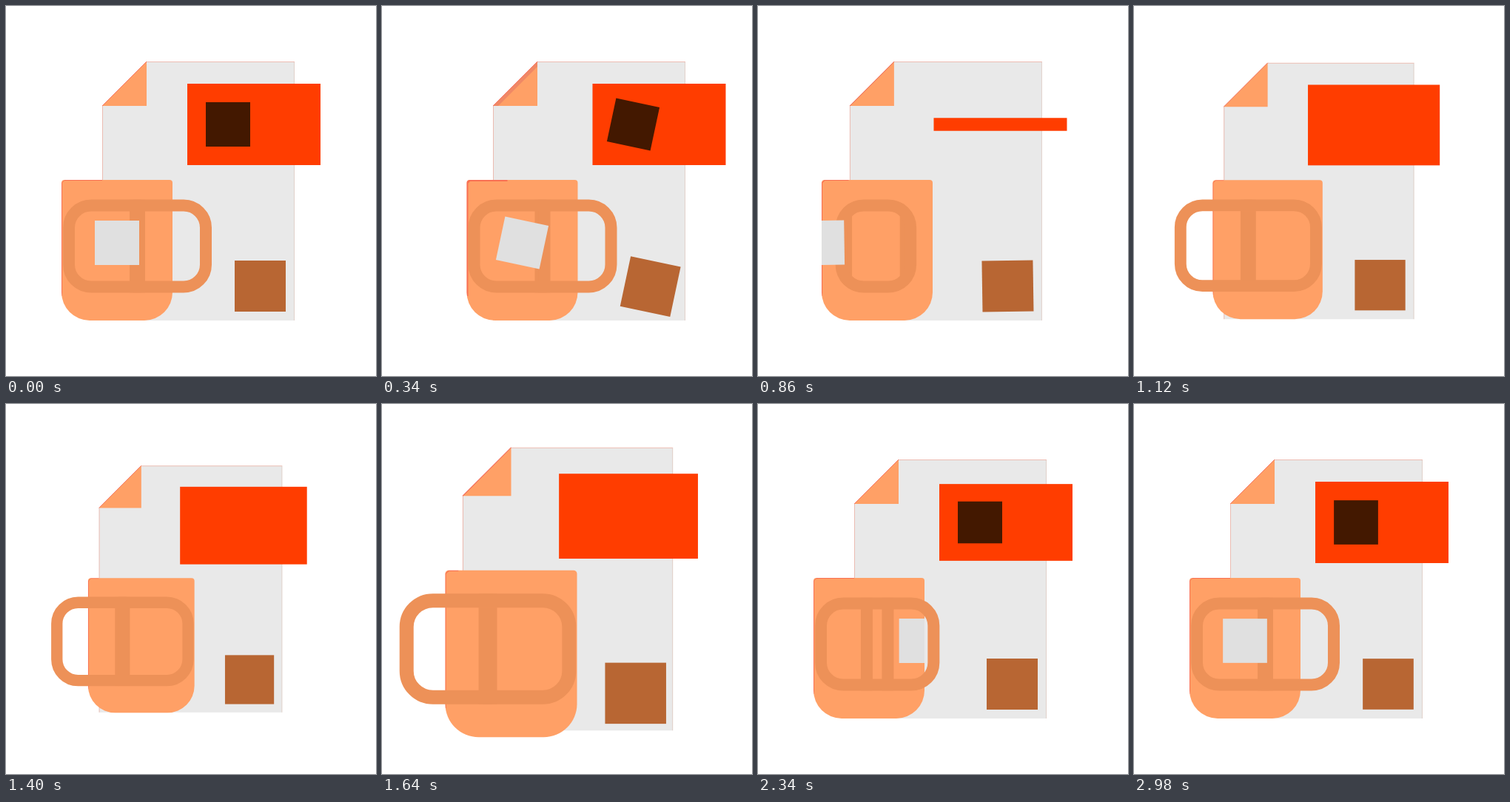
Animation of 500x500 px, one loop 3000 ms. Source, as an HTML page with a canvas:

```html
<!DOCTYPE html>
<html lang="en">
<head>
<meta charset="utf-8">
<title>Stationery set</title>
<style>
html, body { margin: 0; width: 100%; height: 100%; overflow: hidden; background: #fff; }
canvas { display: block; width: 500px; height: 500px; }
</style>
</head>
<body>
<canvas id="stage" width="500" height="500"></canvas>
<script>
const ctx = document.getElementById('stage').getContext('2d');
const LOOP = 3000;
const PEACH = '#ffa066', HANDLE = '#ed9158', PAPER = '#e9e9e9', RED = '#ff3d00';
const EDGE = 'rgba(245,80,70,.6)', FAINT = 'rgba(240,120,95,.4)';

const sine = p => (1 - Math.cos(Math.PI * p)) / 2;
const quart = p => p < .5 ? 8 * p ** 4 : 1 - 8 * (1 - p) ** 4;
const outQuart = p => 1 - (1 - p) ** 4;
const outQuad = p => 1 - (1 - p) ** 2;
const mix = (a, b, p) => a + (b - a) * p;

const span = (t, from, to) => Math.min(1, Math.max(0, (t - from) / (to - from)));
const ramp = (t, from, to, ease = sine) => ease(span(t, from, to));
const bell = (t, from, to) => Math.sin(Math.PI * span(t, from, to)) ** 2;
const swell = (t, from, peak) => 1 + .1 * (ramp(t, from, peak) - ramp(t, 1860, 2120));

function pose(t) {
  // Sway right, left and back, one leg each
  const leg = i => ramp(t, 320 * i, 320 * (i + 1), quart);
  return {
    lean: leg(0) - 2 * leg(1) + leg(2),
    pulse: 1 - .1 * bell(t, 2730, LOOP),
    group: swell(t, 1340, 1700) - .06 * bell(t, 1040, 1640) - .015 * bell(t, 2020, 2220),
    markScale: swell(t, 1340, 1700),
    mugScale: swell(t, 1340, 1740),
    cardScale: swell(t, 1580, 1860) - .065 * bell(t, 1420, 1780),
    side: ramp(t, 680, 1060) - ramp(t, 2160, 2330),
    turn: ramp(t, 680, 1020) - ramp(t, 2160, 2390),
    spin: ramp(t, 670, 1070) - ramp(t, 2190, 2640, outQuart),
    slide: t < 1600 ? -160 * ramp(t, 670, 1070)
                    : 160 * (1 - ramp(t, 2190, 2640, outQuad))
  };
}

function at(x, y, sx, sy, draw) {
  ctx.save();
  ctx.translate(x, y);
  ctx.scale(sx, sy);
  draw();
  ctx.restore();
}

function clipped(path, draw) {
  ctx.save();
  ctx.clip(path);
  draw();
  ctx.restore();
}

function box(x, y, w, h, radii) {
  const path = new Path2D();
  path.roundRect(x, y, w, h, radii);
  return path;
}

function poly(d, color) {
  ctx.fillStyle = color;
  ctx.fill(new Path2D(d));
}

function line(d, color, width = 1) {
  ctx.strokeStyle = color;
  ctx.lineWidth = width;
  ctx.stroke(new Path2D(d));
}

function mark(x, y, p, color, left = -30, size = 60, scale = 1) {
  at(x, y, scale * p.pulse, scale * p.pulse, () => {
    ctx.rotate(p.lean * Math.PI / 15);
    ctx.fillStyle = color;
    ctx.fillRect(left, left, size, size);
  });
}

function page(p) {
  at(20 * p.lean - 10 * p.side, 0, 1, 1, () => {
    const fold = 'M190 75V135H130Z', crease = 'M190 75L130 135';
    poly('M190 75H390V425H130V135Z', PAPER);
    line('M130.5 135V425M190 75.5H390', FAINT);
    line('M389.5 76V425', 'rgba(215,180,165,.45)');
    poly(fold, PEACH);
    clipped(new Path2D(fold), () =>
      line(crease, 'rgba(225,115,100,.5)', 1 + 9 * Math.abs(p.lean)));
    line(crease, EDGE);
    mark(340, 375, p, '#b86633', -31, 69, p.markScale);
  });
}

function card(p) {
  const turn = Math.cos(Math.PI * p.turn);
  const x = 335 + 39.5 * p.lean - 10 * p.side;
  at(x, 160, p.cardScale, p.cardScale * Math.abs(turn), () => {
    ctx.fillStyle = RED;
    ctx.fillRect(-90, -55, 180, 110);
    if (turn > 0) mark(-35, 0, p, '#431800');
  });
}

// Two overlapping loops that trade places as the mug spins
function handle(p) {
  const a = mix(-73, -37, p.side);
  const b = mix(17, -127, p.spin);
  const w = 111 - 8 * Math.sin(Math.PI * p.spin);
  const left = Math.min(a, b), right = Math.max(a, b);
  const top = -68.5, height = 126, bar = 16;
  clipped(box(left, top, right + w - left, height, 38), () => {
    ctx.fillStyle = HANDLE;
    ctx.fillRect(right, top, bar, height);
    ctx.fillRect(left + w - bar, top, bar, height);
  });
  ctx.strokeStyle = HANDLE;
  ctx.lineWidth = bar;
  ctx.stroke(box(left + 8, top + 8, right + w - left - bar, height - bar, 30));
}

function mug(p) {
  const body = box(-75, -95, 150, 190, [4, 4, 38, 38]);
  const x = 150 + 39.5 * p.lean + 30 * p.side;
  at(x, 330, p.mugScale, p.mugScale, () => {
    ctx.fillStyle = PEACH;
    ctx.fill(body);
    clipped(body, () => line(`M-74.5 62V-91L-71 -94.5H${mix(-20, -60, p.side)}`,
      EDGE, 1 + 2 * Math.abs(p.lean)));
    handle(p);
    clipped(body, () => mark(p.slide, -10, p, '#e0e0e0'));
  });
}

function frame() {
  const p = pose(performance.now() % LOOP);
  ctx.fillStyle = '#fff';
  ctx.fillRect(0, 0, 500, 500);
  at(239, 250, p.group, p.group, () => {
    ctx.translate(-239, -250);
    page(p);
    card(p);
    mug(p);
  });
  requestAnimationFrame(frame);
}
frame();
</script>
</body>
</html>
```
